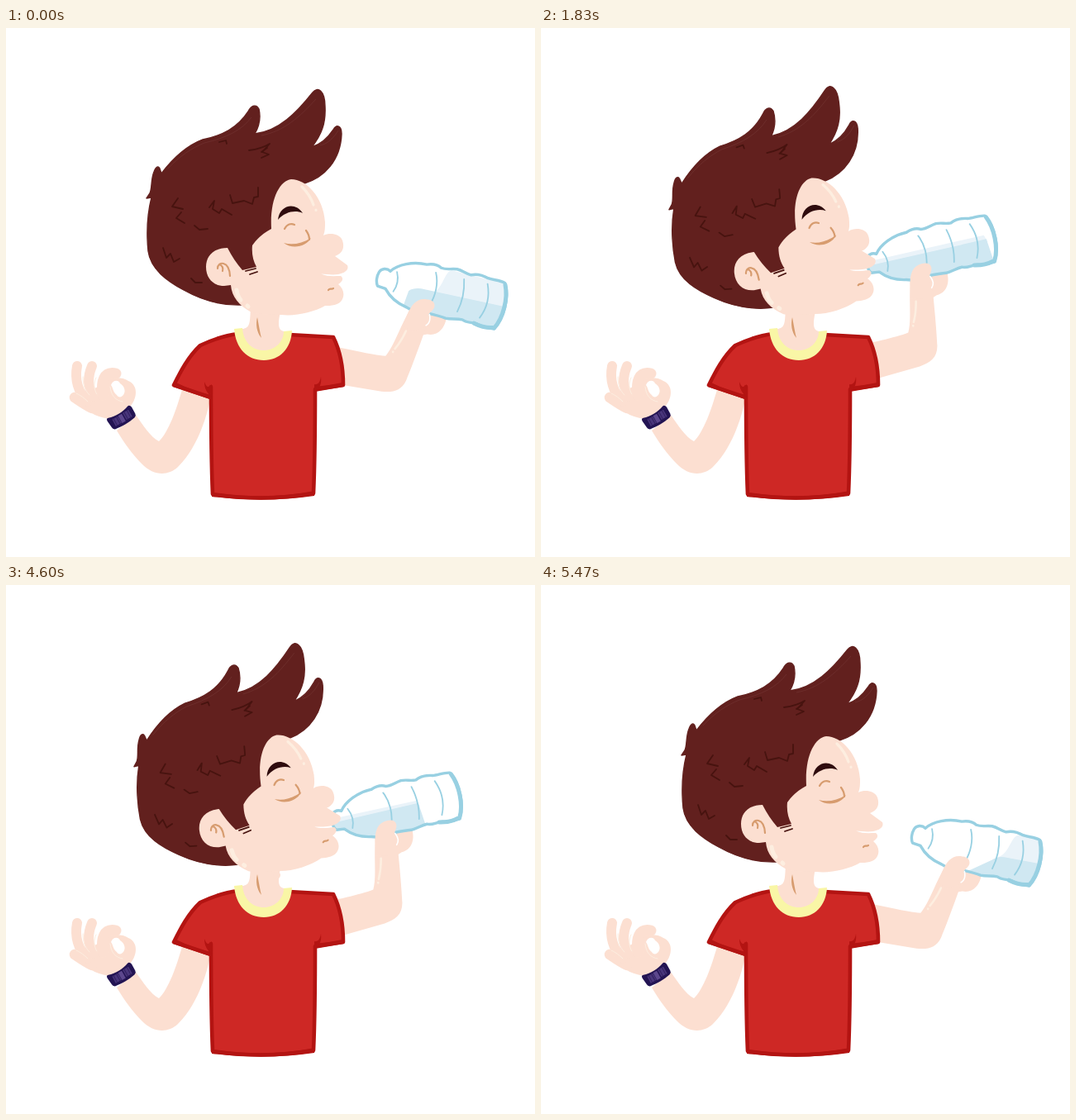
Write an HTML page that moves like this. It is 640 by 640 pixels and loops after 6.01 s.

```html
<!DOCTYPE html>
<html lang="en">
<head>
<meta charset="utf-8">
<title>Drinking water</title>
<style>
html, body { margin: 0; width: 100%; height: 100%; overflow: hidden; background: #fff; }
svg { display: block; width: 100vw; height: 100vh; }
.skin { fill: #fcdfd1; }
.finger { fill: none; stroke: #fcdfd1; stroke-linecap: round; }
.shine { fill: none; stroke: #fdeee0; stroke-linecap: round; }
.crease { fill: none; stroke: #d79c6f; stroke-width: 2.2; stroke-linecap: round; }
.fold { fill: #d79c6f; }
.hair { fill: #62201e; stroke: #62201e; stroke-width: 1.4; stroke-linejoin: round; }
.lock { fill: none; stroke: #47130f; stroke-width: 1.8; stroke-linejoin: round; stroke-linecap: round; }
.strand { fill: none; stroke: #713331; stroke-width: .7; }
.glass { fill: none; stroke: #98d0e2; stroke-linecap: round; stroke-linejoin: round; }
</style>
</head>
<body>
<svg viewBox="0 0 640 640">
  <defs>
    <path id="bottle" d="M435 280C430 277 424 279 422 284C420 290 421 297 424 301L434 302C441 310 452 316 464 318C472 321 482 321 490 319C498 319 506 319 513 320C520 320 526 317 533 317C539 320 545 317 552 318C559 320 567 320 573 319C577 312 580 302 580 291C580 280 578 269 573 262C566 260 558 262 552 261C545 259 537 259 531 262C524 262 520 259 513 259C505 260 501 263 494 262C487 258 481 260 476 262C459 262 442 270 435 280Z"/>
    <clipPath id="inside"><use href="#bottle"/></clipPath>
  </defs>

  <!-- raised arm -->
  <g class="skin">
    <path d="M134 487C141 499 152 515 165 528C178 541 195 543 208 531C228 511 240 482 247 450L246 440L214 434C206 463 196 490 185 500C175 495 166 481 157 468Z"/>
    <path d="M94 444C100 432 108 442 115 428C122 424 138 420 148 427C160 432 159 447 151 457L150 463L128 473C112 472 101 466 92 456Z"/>
    <path class="finger" stroke-width="12.5" d="M104 460C96 456 89 451 83 447"/>
    <path class="finger" stroke-width="12" d="M99 452C87 441 83 425 86 409"/>
    <path class="finger" stroke-width="12" d="M106 446C98 434 99 421 104 409"/>
    <path class="finger" stroke-width="13" d="M117 444C115 428 118 415 133 418"/>
  </g>
  <path fill="#fff" d="M127 432C129 426 136 425 138 430C142 432 145 438 143 442C141 447 136 448 134 444C129 440 130 436 127 432Z"/>
  <g class="shine" stroke-width="1">
    <path d="M85 442C90 444 95 448 99 452"/>
    <path d="M93 422C93 431 95 438 101 444"/>
    <path d="M109 423C106 430 106 437 110 443"/>
    <path d="M126 434C127 445 133 451 141 452"/>
  </g>
  <g transform="translate(140 472) rotate(-29)">
    <path fill="#231453" d="M-14-8C-6-5 6-6 13-9Q16-10 17-6L17 3Q17 6 14 7C6 9 -6 9 -13 8Q-16 7-16 4L-17-5Q-17-9-14-8Z"/>
    <rect x="-11" y="-4" width="8" height="9" fill="#49367b"/>
    <rect x="-2.500" y="-4.500" width="5" height="10" fill="#5c478d"/>
    <rect x="4" y="-5" width="8" height="9.500" fill="#49367b"/>
    <path d="M-9-5V5M-5-5V5M6-5V5M10-5V5" stroke="#32205f"/>
  </g>

  <!-- arm with bottle -->
  <g id="arm">
    <path class="skin" d="M488 318L514 320C515 333 508 344 496 344L486 348Z"/>
    <path class="skin" d="M380 385C405 383 436 384 453 381C458 371 460 358 463 343L470 312L493 314L493 334C491 350 488 380 484 404C481 418 472 422 458 424L385 429Z"/>
    <use href="#bottle" fill="#fff"/>
    <g clip-path="url(#inside)">
      <path id="pale" fill="#eaf3f9"/>
      <path id="deep" fill="#d0e8f2"/>
    </g>
    <g class="glass" stroke-width="1.800">
      <path d="M443 279C447 287 447 296 444 303"/>
      <path d="M489 269C495 281 495 296 491 308"/>
      <path d="M524 269C528 283 528 297 525 309"/>
      <path d="M553 268C559 282 559 297 553 310"/>
      <use href="#bottle" stroke-width="3.400"/>
      <path stroke-width="5" d="M574 264C581 279 581 304 573 318M548 318C556 320 564 320 571 318"/>
    </g>
    <path class="skin" d="M467 327C469 312 475 303 487 303C496 302 499 309 495 315C491 320 491 326 492 336L478 345L464 341Z"/>
    <path fill="none" stroke="#fff" stroke-width="1.600" stroke-linecap="round" d="M493 320C496 326 495 331 492 334"/>
    <path class="shine" stroke-width="2.600" d="M470 346C468 356 465 364 462 370M460.500 374V374.500"/>
  </g>

  <!-- neck and shirt -->
  <path fill="#ce2825" stroke="#b31412" stroke-width="4.600" stroke-linejoin="round" d="M280 370C264 372 248 378 235 384C220 398 211 416 203 432L248 447L248 434C248 475 248 520 250 564C290 570 332 570 372 563C374 520 374 475 374 437L408 432C408 410 404 390 396 374L343 371Z"/>
  <g fill="#b31412">
    <path d="M202 434L206 429C220 436 234 441 248 444V449.500Z"/>
    <path d="M409 434L407 429C396 431 385 433 374 434V440Z"/>
    <path d="M240 428C242 433 244 437 249 431L249 446C243 442 240 436 240 428Z"/>
    <path d="M381 422C380 429 377 432 373 431V440C380 436 382 430 381 422Z"/>
    <path d="M249 562C290 568 332 568 374 560L373 566C334 572 288 572 249 567Z"/>
  </g>
  <path class="skin" d="M296 338C295 355 296 364 285 364C285 383 297 394 312 394C327 394 337 383 338 367C330 367 328 361 332 343L325 334Z"/>
  <ellipse id="gulp" class="skin" cx="327.500" cy="340" rx="4.500" ry="4.500"/>
  <path fill="#f9f6a6" d="M276 364L286 363C287 380 298 390 312 390C325 390 336 380 336 367L346 366C345 388 331 402 312 402C292 402 278 388 276 364Z"/>
  <path class="fold" d="M304 350C306 360 307 367 309 375C303 368 302 358 304 350Z"/>

  <g id="head">
    <path class="hair" d="M344 184L361 188C385 181 405 160 406 128C406 118 400 116 396 123C388 135 380 141 370 144C382 129 387 115 386 95C386 76 377 70 371 78C352 102 330 125 301 128C307 118 308 107 306 98C303 92 297 93 293 101C280 121 262 130 238 135C217 143 201 159 188 176L186 170C184 166 181 168 179 174C175 184 177 193 174 200L170 206L176 205C171 225 170 250 172 270C175 292 195 306 215 317C240 331 262 336 286 335L330 290L350 220Z"/>
    <path class="strand" d="M196 170C210 155 225 145 240 139C266 133 285 124 297 108M309 130C336 125 355 108 375 86M380 142C390 140 397 132 402 124"/>
    <path class="skin" d="M345 183C363 183 384 204 386 235C386 241 386 246 384 251C392 247 404 249 407 257C410 266 407 273 398 276L413 287C415 292 411 296 402 298C395 299 388 298 381 297.500C389 301 397 300 405 300C409 303 407 307 402 310C408 315 410 322 407 328C403 336 393 336 386 336C372 344 350 349 333 347C318 347 306 346 297 344C282 336 273 325 272 311L264 312C251 312 242 303 242 289C242 276 251 266 268 266C273 276 279 285 286 293L303 289C299 282 297 273 298 263C304 254 312 248 321 243C319 207 331 185 345 183Z"/>
    <g class="lock">
      <path d="M294 148C302 147 311 145 319 140L310 150L318 153L309 157"/>
      <path d="M246 217L252 209L250 219L258 224L261 219L273 226"/>
      <path d="M271 202L274 212L288 209L298 213L300 205L305 204V193"/>
      <path d="M208 206L201 216L214 219M212 223L206 230L216 236"/>
      <path d="M228 239L234 244L244 243M224 303L229 308L237 308"/>
      <path d="M190 266L194 278L199 273L203 283L210 279"/>
      <path d="M258 138L266 136L267 140M290 294L302 291M295 298L304 295"/>
      <path d="M309 150L316 145"/>
    </g>
    <path fill="#2f0c0e" d="M329 232C331 214 350 210 359 224C350 220 338 222 329 232Z"/>
    <path class="fold" d="M336 260C346 263 358 261 369 254C363 265 346 268 336 260Z"/>
    <g class="crease">
      <path d="M337 243C340 237 345 236 349 238M363 245C366 249 367 252 367 256"/>
      <path d="M256 291C256 282 270 281 271 300M258 286C262 287 263 291 262 294M390 317C392 314 394 317 396 315"/>
    </g>
    <path class="shine" stroke-width="3.200" d="M358 192C365 199 370 208 372 214M375 220V220.500"/>
    <path class="shine" stroke-width="5" d="M279 317C280 323 282 327 284 329M292 336L293 337"/>
  </g>
</svg>
<script>
const LOOP = 6010, GULP = 655, FIRST_GULP = 700, GULPS = 6;
const [arm, head, gulp, pale, deep] =
  ['arm', 'head', 'gulp', 'pale', 'deep'].map(id => document.getElementById(id));

// Right edge of the water while it is drunk
const drain = [[700, 580], [1370, 575], [2030, 572], [2670, 568], [3330, 560], [3970, 546], [4600, 532], [4930, 525]];

// Water outline in the bottle: deep left bottom, left top x, y, right | pale left, top left x, y, right y
const full = [412, 414, 291, 585, 412, 414, 287, 284];
const low = [412, 414, 291, 525, 412, 414, 287, 287];
const start = [459, 462, 298, 585, 490, 507, 262, 263];
const end = [490, 522, 299, 585, 528, 547, 262, 263];

const clamp = v => Math.min(1, Math.max(0, v));
const ease = v => { v = clamp(v); return v * v * (3 - 2 * v); };
const mix = (a, b, k) => a + (b - a) * k;
const blend = (a, b, k) => a.map((v, i) => mix(v, b[i], k));

function follow(steps, t) {
  const i = steps.findIndex(s => s[0] > t);
  if (i === 0) return steps[0][1];
  if (i < 0) return steps[steps.length - 1][1];
  const [a, b] = [steps[i - 1], steps[i]];
  return mix(a[1], b[1], (t - a[0]) / (b[0] - a[0]));
}

function waterAt(t) {
  if (t < 700) return blend(start, full, ease((t - 30) / 290));
  if (t < 4930) {
    const w = blend(full, low, clamp((t - 700) / 4230));
    w[3] = follow(drain, t);
    return w;
  }
  return blend(low, end, ease((t - 4930) / 540));
}

function gulpAt(t) {
  const n = (t - FIRST_GULP) / GULP;
  if (n < 0) return 0;
  const phase = n % 1;
  const rise = n < GULPS ? ease((phase - .74) / .16) : 0;
  const fall = n >= 1 && n < GULPS + 1 ? 1 - ease(phase / .15) : 0;
  return Math.max(rise, fall);
}

function draw(t) {
  const lift = t < 2500 ? ease((t - 40) / 560) : 1 - ease((t - 4715) / 755);
  arm.setAttribute('transform', `rotate(${mix(13.3, -12, lift)} 389 416)`);
  head.setAttribute('transform', `rotate(${-5 * lift} 320 386)`);
  gulp.setAttribute('cy', mix(340, 351, gulpAt(t)));

  const [lb, lx, ly, r, pl, px, py, pr] = waterAt(t);
  deep.setAttribute('d', `M${lb} 324L${lx} ${ly}Q${lx + 5} 293 ${lx + 14} 292L${r - 4} 290L${r} 324Z`);
  pale.setAttribute('d', `M${pl} 294C${mix(pl, px, .7)} 288 ${mix(pl, px, .5)} ${py + 3} ${px} ${py}L${r - 6} ${pr}L${r - 3} 294Z`);
}

function tick() {
  draw(performance.now() % LOOP);
  requestAnimationFrame(tick);
}
tick();
</script>
</body>
</html>
```
